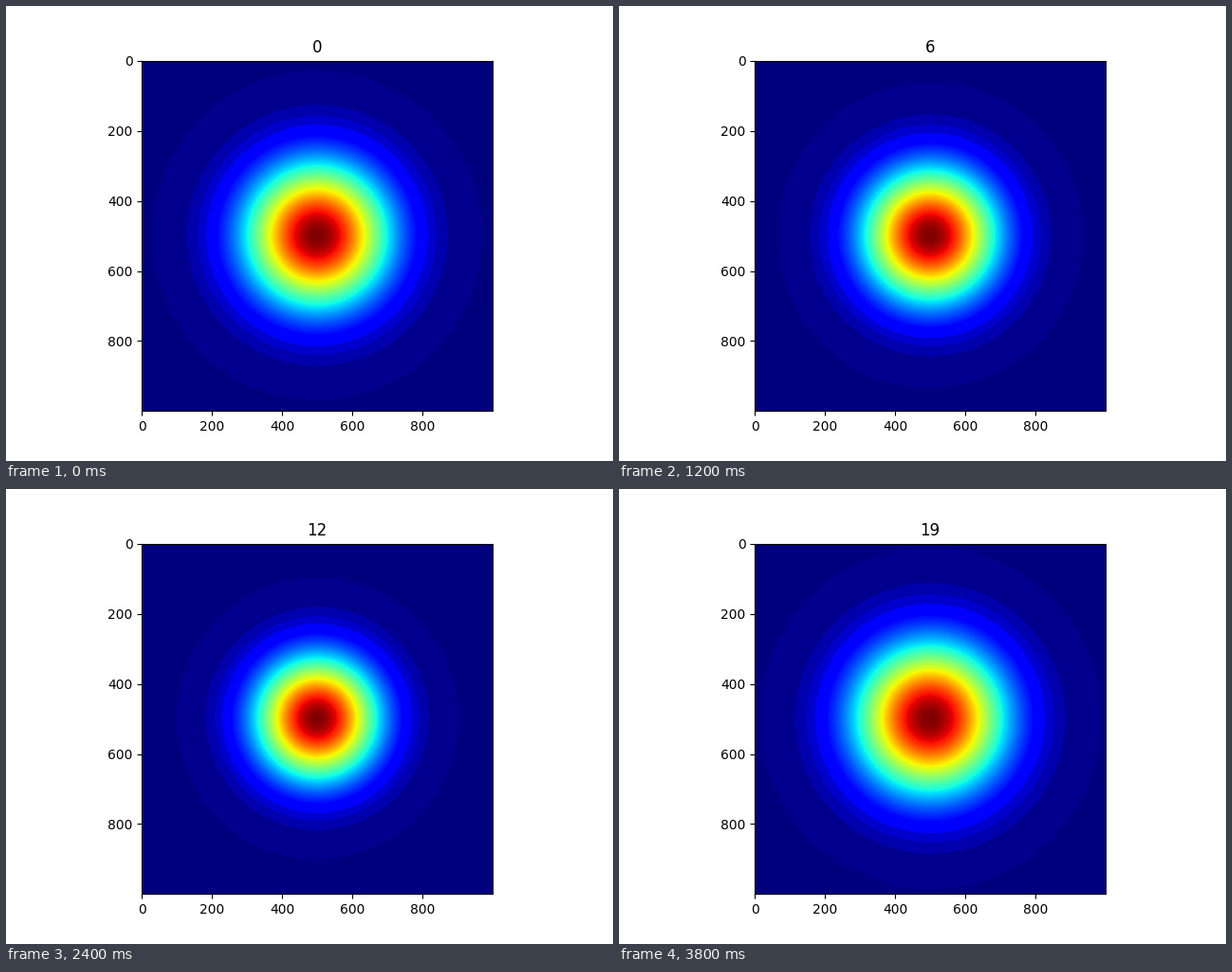
Write a matplotlib script that moves like this. It is 640x480 px and loops after 4 s.

```python
import numpy as np
import matplotlib.pyplot as plt
from matplotlib.animation import FuncAnimation
from matplotlib.colors import ListedColormap

FRAMES = 20
INTERVAL = 200
SIZE = 1000


def banded_jet():
    """Jet with its dark blue end drawn as a few flat bands."""
    colors = plt.get_cmap("jet")(np.arange(256))
    bands = [(1, 8, 140), (8, 14, 172), (14, 21, 204), (21, 35, 254)]
    for start, stop, blue in bands:
        colors[start:stop, :3] = (0, 0, blue / 255)
    return ListedColormap(colors)


axis = np.linspace(-5, 5, SIZE)
r2 = axis[:, None] ** 2 + axis[None, :] ** 2


def bell(n):
    variance = 2 + np.sin(n)
    return np.exp(-r2 / (2 * variance))


plt.rcParams["font.family"] = "DejaVu Sans"
fig, ax = plt.subplots(figsize=(6.4, 4.8), dpi=100)
image = ax.imshow(bell(0), cmap=banded_jet())
title = ax.set_title("0")


def update(n):
    image.set_data(bell(n))
    image.autoscale()
    title.set_text(str(n))
    return image, title


anim = FuncAnimation(fig, update, frames=FRAMES, interval=INTERVAL,
                     repeat=True, repeat_delay=0, blit=False)
plt.show()
```
